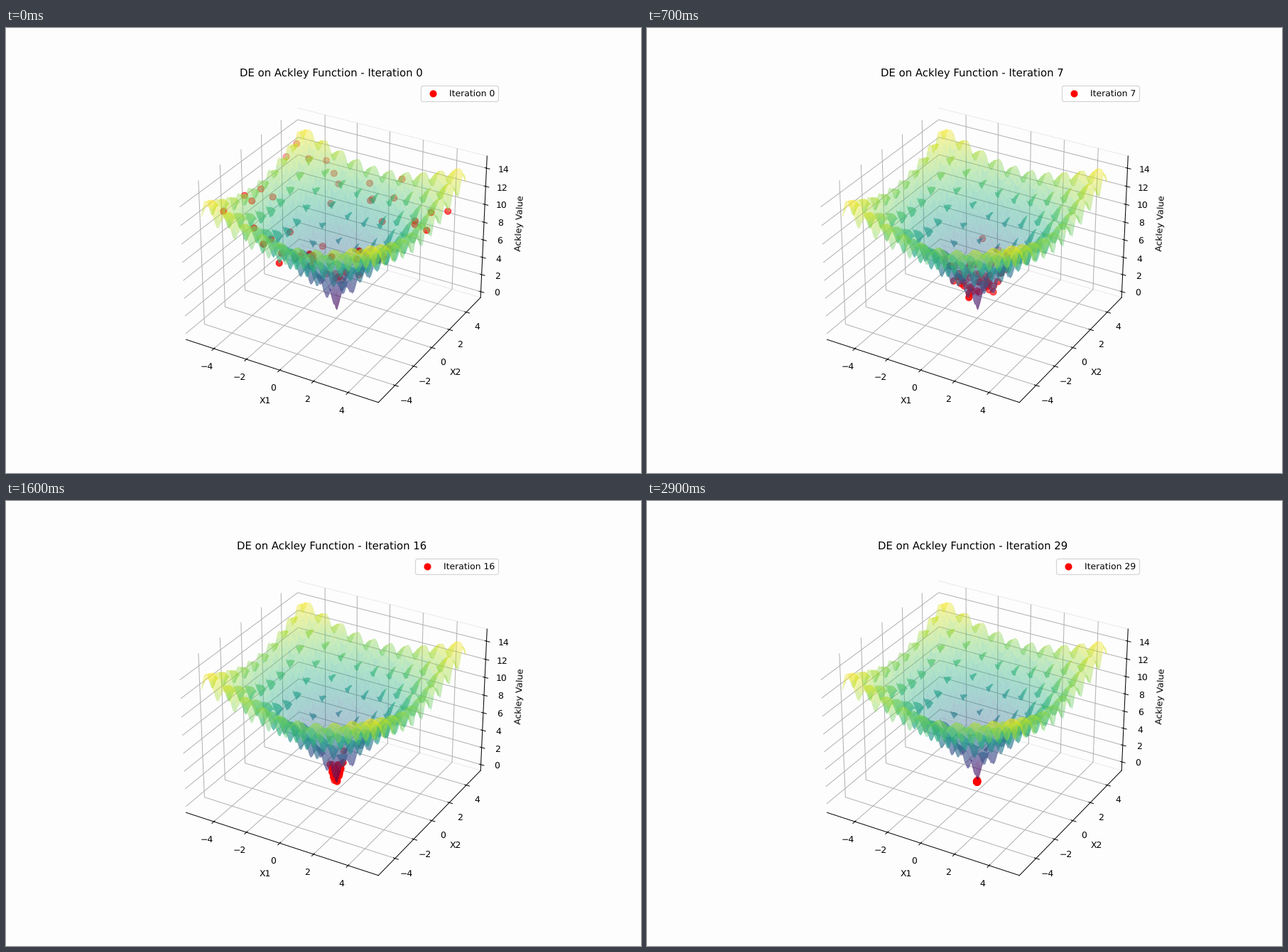
Recreate the animation shown at these times as a matplotlib script. Size 894 by 626 pixels, loop 3 s.

```python
import numpy as np
import matplotlib.pyplot as plt
from matplotlib.animation import FuncAnimation

W, H, DPI = 894, 626, 89.4
STEPS, INTERVAL = 30, 100
MEMBERS = 50
PAPER = "#fdfdfd"

plt.rcParams["text.hinting"] = "no_hinting"
rng = np.random.default_rng(7)


def ackley(x, y):
    bowl = -20 * np.exp(-0.2 * np.sqrt(0.5 * (x**2 + y**2)))
    ripple = -np.exp(0.5 * (np.cos(2 * np.pi * x) + np.cos(2 * np.pi * y)))
    return bowl + ripple + 20 + np.e


X, Y = np.meshgrid(np.linspace(-5, 5, 100), np.linspace(-5, 5, 100))
Z = ackley(X, Y)


def best_depth(t):
    """Lowest value the population may have reached by iteration t."""
    return min(2.6, Z.min() * np.exp(0.45 * (13 - t)))


def spread(t):
    """Width of the search around the optimum, shrinking exponentially."""
    return 2.5 * np.exp(-t / 6)


def first_population():
    """Uniform over the domain, without the far corners."""
    p = rng.uniform(-5, 5, (4 * MEMBERS, 2))
    keep = (np.hypot(*p.T) < 6) & (ackley(*p.T) > best_depth(0))
    return p[keep][:MEMBERS]


def evolve():
    """Greedy selection: a member moves only when its trial is better."""
    pops = [first_population()]
    for t in range(1, STEPS):
        old = pops[-1]
        trial = rng.normal(0, spread(t), old.shape)
        value = ackley(*trial.T)
        better = (value < ackley(*old.T)) & (value > best_depth(t))
        moves = better & (rng.random(MEMBERS) < 0.6)
        pops.append(np.where(moves[:, None], trial, old))
    return pops


generations = evolve()

fig = plt.figure(figsize=(W / DPI, H / DPI), dpi=DPI, facecolor=PAPER)
ax = fig.add_subplot(projection="3d", facecolor=PAPER)


def draw_surface():
    ax.plot_surface(X, Y, Z, cmap="viridis", alpha=0.4, edgecolor="none")
    for axis in (ax.xaxis, ax.yaxis, ax.zaxis):
        axis.pane.set_fill(False)
        axis.pane.set_alpha(0)
    ax.yaxis.pane.set_alpha(1)
    ax.yaxis.pane.set_edgecolor("0.93")
    ax.set_xlabel("X1")
    ax.set_ylabel("X2")
    ax.set_zlabel("Ackley Value")


def update(i):
    ax.clear()
    draw_surface()
    x, y = generations[i].T
    ax.scatter(x, y, ackley(x, y), color="red", s=50, label=f"Iteration {i}")
    ax.set_title(f"DE on Ackley Function - Iteration {i}")
    ax.legend(loc="upper right")
    return ()


anim = FuncAnimation(fig, update, frames=STEPS, interval=INTERVAL,
                     repeat=True, repeat_delay=0, blit=False)
plt.show()
```
